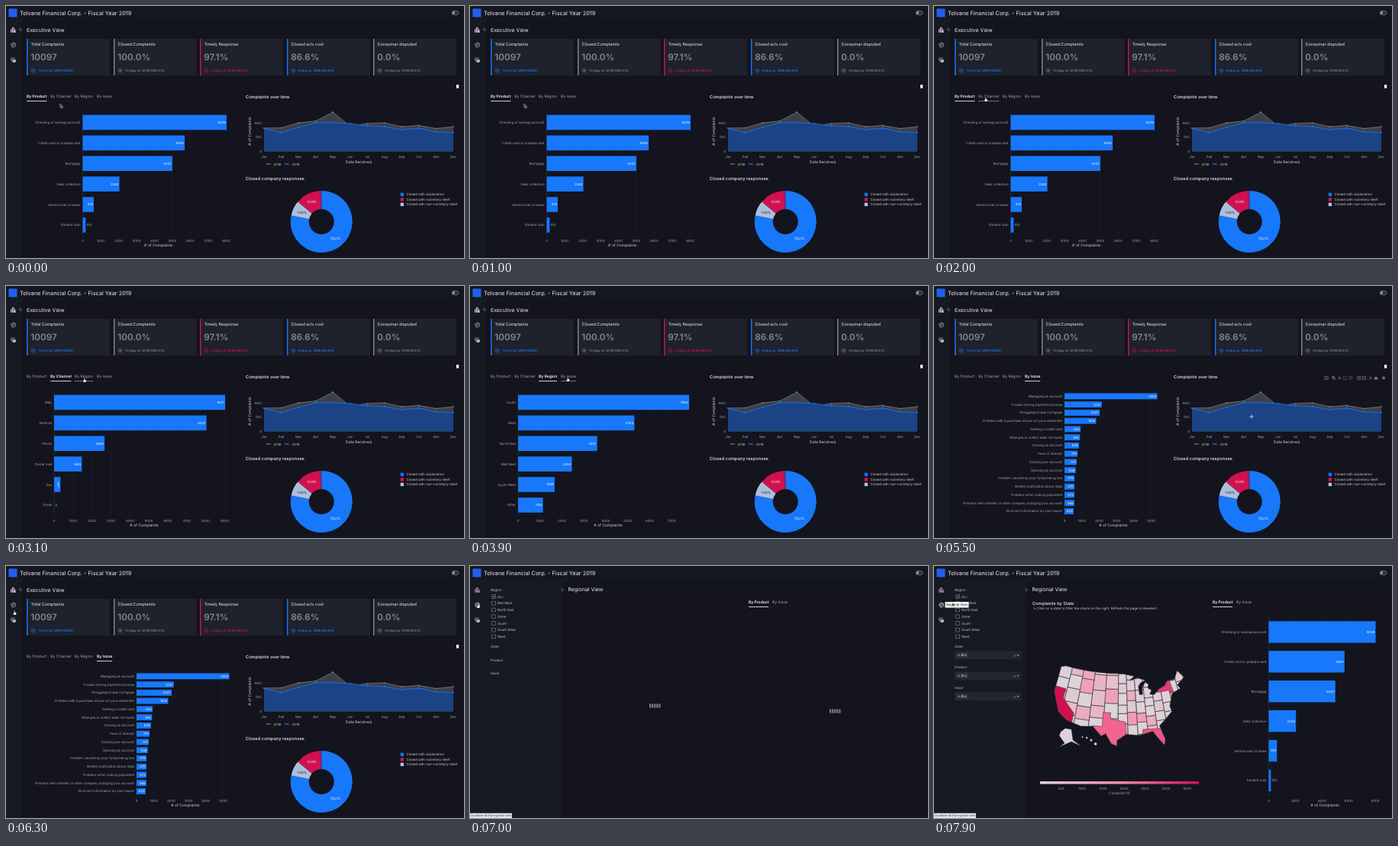
An HTML page that plays this animation: 600 by 330 pixels, repeating every 8000 ms.

```html
<!DOCTYPE html>
<html lang="en">
<head>
<meta charset="utf-8">
<title>Executive dashboard</title>
<style>
html, body { margin: 0; width: 100%; height: 100%; overflow: hidden; background: #13141e; }
svg { display: block; width: 600px; height: 330px; font-family: Inter, Roboto, sans-serif; text-rendering: geometricPrecision; }
</style>
</head>
<body>
<svg id="stage" viewBox="0 0 600 330"></svg>
<script>
const BLUE = '#1778fb', PINK = '#cf1150', PALE = '#adbedc', GREY = '#85878e';
const WHITE = '#ececee', LIGHT = '#d0d1d5', SOFT = '#a6a8ae', GRID = '#20232d', LAND = '#dcd3d8', DARK = '#2a2530';
const LOOP = 8000;

// Drawing helpers; text is placed by its vertical centre.
const text = (x, y, s, size = 4.35, fill = SOFT, anchor = 'start', weight = 400, extra = '') =>
  `<text x="${x}" y="${y + size * .36}" font-size="${size}" fill="${fill}" text-anchor="${anchor}" font-weight="${weight}" ${extra}>${s}</text>`;
const rect = (x, y, w, h, fill, extra = '') =>
  `<rect x="${x}" y="${y}" width="${w}" height="${h}" fill="${fill}" ${extra}/>`;
const path = (d, stroke, width = .6, fill = 'none', extra = '') =>
  `<path d="${d}" stroke="${stroke}" stroke-width="${width}" fill="${fill}" ${extra}/>`;
const circle = (x, y, r, fill, stroke = 'none') =>
  `<circle cx="${x}" cy="${y}" r="${r}" fill="${fill}" stroke="${stroke}" stroke-width=".6"/>`;
const group = (id, body, extra = '') => `<g id="${id}" ${extra}>${body}</g>`;
const each = (list, draw) => list.map(draw).join('');

function frame() {
  return rect(0, 0, 600, 18, '#151720') + rect(0, 18, 20, 312, '#171922') +
    path('M0 18H600M20 18V330', '#1e2029', .5) + rect(3.5, 3.5, 11, 11, '#1f5ff0') +
    text(18, 9, 'Tolvane Financial Corp. - Fiscal Year 2019', 7.4, WHITE) +
    rect(584, 6.6, 9, 4.8, '#2a2c35', 'rx="2.4" stroke="#9a9ca2" stroke-width=".6"') + circle(586.5, 9, 1.4, '#b4b6ba');
}

function navIcons(active) {
  const tone = i => i === active ? '#ececee' : '#aeb0b5';
  return path('M6.8 34V30.5H8.5V34M8.5 34V28.4H10.4V34M10.4 34V31.2H12.2V34ZM6 34H13', tone(0), .8) +
    circle(9.8, 51, 3, 'none', tone(1)) + path('M7 50L9.5 51.5L9 53.8M10.5 48.2L10 50L12.6 51.2', tone(1), .8) +
    rect(8.3, 69.9, 4.5, 4, tone(2)) + path('M6.8 72.3V68.2H11.6', tone(2), .8);
}

const collapse = x => circle(x, 31, 2.4, '#2a2c36') + path(`M${x + .6} 29.8L${x - .6} 31L${x + .6} 32.2`, '#999', .5);

function kpi([title, value, delta, tone], i) {
  const x = Math.round(27 + i * 113.5);
  return rect(x, 43, 109, 48, '#1f222c') + rect(x, 43, 1.4, 48, tone) +
    text(x + 5.5, 50, title, 5.55, WHITE) + text(x + 5.3, 66.9, value, 11.7, GREY, 'start', 600) +
    circle(x + 8.5, 84.5, 2.3, 'none', tone) + path(`M${x + 7.2} 84.5h2.6m-1.3 -1.3v2.6`, tone, .5) +
    text(x + 14.5, 84.5, delta, 4.2, tone, 'start', 600);
}

const tabs = (list, y, active) => each(list, ([x, w, s], i) => i === active
  ? text(x, y, s, 5, '#fff', 'start', 600) + rect(x, y + 6, w, .8, '#fff')
  : text(x, y, s, 5, SOFT));

// Horizontal bar chart: rows share the height evenly, the longest bar leaves a 5% margin.
function bars({ x0, right, top, step, rows }) {
  const max = Math.max(...rows.map(r => r[1])), k = (right - x0) / (1.053 * max), dy = (300.3 - top) / rows.length;
  let out = '';
  for (let v = 0; v <= max; v += step) {
    const x = x0 + v * k;
    out += path(`M${x} ${top}V301`, v ? GRID : '#3a3d47', .5) + text(x, 307, v, 4.35, SOFT, 'middle');
  }
  out += each(rows, ([name, v], i) => {
    const y = top + (i + .5) * dy, w = v * k, end = x0 + w, h = dy * .73;
    const label = w >= 10 ? text(end - 1.2, y, v, 4.2, '#fff', 'end')
      : w >= 8 ? text(0, 0, v, 4.2, '#fff', 'middle', 400, `transform="translate(${end - 2.8} ${y}) rotate(90)"`)
      : text(end + 1.2, y, v);
    return text(x0 - 3, y, name, 4.35, SOFT, 'end') + rect(x0, y - h / 2, w, h, BLUE) + label;
  });
  return out + text((x0 + right) / 2, 313, '# of Complaints', 5, LIGHT, 'middle');
}

const table = s => s.split(', ').map(r => r.match(/(.+) (\d+)/).slice(1)).map(([name, v]) => [name, +v]);
const products = table('Checking or savings account 8028, Credit card or prepaid card 5690, Mortgage 5000, Debt collection 2048, Vehicle loan or lease 618, Student loan 163');
const channels = table('Web 9031, Referral 8047, Phone 2665, Postal mail 1465, Fax 337, Email 4');
const regions = ['South', 'West', 'North East', 'Mid West', 'South West', 'Other'].map((s, i) => [s, Math.round(7800 * .68 ** i)]);
const issues = table('Managing an account 5353, Trouble during payment process 2147, Struggling to pay mortgage 2027, ' +
  'Problem with a purchase shown on your statement 1825, Getting a credit card 926, Attempts to collect debt not owed 894, ' +
  'Closing an account 834, Fees or interest 751, Closing your account 701, Opening an account 648, ' +
  'Problem caused by your funds being low 579, Written notification about debt 575, Problem when making payments 572, ' +
  'Problem with a lender or other company charging your account 566, Incorrect information on your report 523');

const viewTabs = [[27, 26.3, 'By Product'], [58.3, 27, 'By Channel'], [90, 24, 'By Region'], [119, 20, 'By Issue']];
const views = [[100.5, products], [63, channels], [63, regions], [171, issues]]
  .map(([x0, rows]) => ({ x0, rows, right: 299, top: 139, step: 1000 }));

function timeChart() {
  const at = i => 338 + i * 22.55;
  const series = [
    [160, 159.5, 153, 150.7, 139, 157.5, 154, 153, 158, 156.5, 160.5, 158],
    [160, 166, 159, 153, 152.3, 154, 157, 158, 162, 160, 165, 165.5]];
  const plots = each(series, (ys, n) => {
    const line = 'M' + ys.map((y, i) => `${at(i)} ${y}`).join('L'), tone = n ? BLUE : '#777a80', x = 340 + n * 24;
    return path(`${line}V190.5H338Z`, 'none', 0, n ? '#1b4386' : '#3d4046') + path(line, tone, .8) +
      each(ys, (y, i) => circle(at(i), y, .9, tone)) +
      path(`M${x} 207h7.5`, tone, .8) + circle(x + 3.8, 207, 1, tone) + text(x + 10.5, 207, 2018 + n, 4.35, LIGHT);
  });
  return text(314, 118.5, 'Complaints over time', 5.7, WHITE, 'start', 500) + path('M338 153H586M338 172H586', GRID, .5) + plots +
    each([1000, 500, 0], (v, i) => text(335, 153 + i * 18.7, v, 4.35, SOFT, 'end')) +
    each('Jan Feb Mar Apr May Jun Jul Aug Sep Oct Nov Dec'.split(' '), (m, i) => text(at(i), 197, m, 4.35, SOFT, 'middle')) +
    path('M338 190.5H586', '#3a3d47', .5) + text(462, 204.3, 'Date Received', 5, LIGHT, 'middle') +
    text(0, 0, '# of Complaints', 5, LIGHT, 'middle', 400, 'transform="translate(319 164) rotate(-90)"');
}

function donut() {
  const outer = 40.5, inner = 16.5;
  const point = (f, r) => `${413.3 + r * Math.sin(f * 2 * Math.PI)} ${282.4 - r * Math.cos(f * 2 * Math.PI)}`;
  const slices = [[.782, BLUE, '78.2%'], [.0794, PALE, '7.94%'], [.131, PINK, '13.8%'], [.0075, '#7a2f80', '']];
  let from = 0;
  const ring = each(slices, ([share, fill, label]) => {
    const a = from, b = from += share, big = +(share > .5), [x, y] = point((a + b) / 2, 28.5).split(' ').map(Number);
    return path(`M${point(a, outer)}A${outer} ${outer} 0 ${big} 1 ${point(b, outer)}L${point(b, inner)}A${inner} ${inner} 0 ${big} 0 ${point(a, inner)}Z`, 'none', 0, fill) +
      text(x, y, label, 4.35, fill === PALE ? '#20232d' : '#fff', 'middle');
  });
  return text(314, 225.7, 'Closed company responses', 5.8, WHITE, 'start', 500) + ring +
    each([['explanation', BLUE], ['monetary relief', PINK], ['non-monetary relief', PALE]], ([s, c], i) =>
      rect(516.7, 244.7 + i * 6.5, 4.4, 4.4, c) + text(524.5, 246.9 + i * 6.5, 'Closed with ' + s, 4.4, LIGHT));
}

function toolbar() {
  const c = '#74777e', box = (x, extra) => rect(x, 118.2, 4.3, 4.3, 'none', `stroke="${c}" stroke-width=".7" ${extra}`);
  return box(511.8) + circle(514, 120.3, .9, c) +
    circle(523.2, 119.8, 1.5, 'none', '#d5d6d9') + path('M524.3 121l1.5 1.5', '#d5d6d9', .9) +
    path('M529 120.3h4.4m-2.2 -2.2v4.4', c, .8) + box(536.6, 'stroke-dasharray="1 .5"') + circle(546, 120, 1.9, 'none', c) +
    box(554.8) + box(561.4) + path('M556 120.3h2m-1 -1v2M562.5 120.3h2M570 118.5l4 3.7m0 -3.7l-4 3.7', c, .8) +
    path('M576.8 120.5l2.2 -2.1l2.2 2.1v1.8h-4.4Z', c, .4, c) + rect(587.3, 118.7, 3.4, 3.4, c);
}

// Albers conic projection; longitudes are degrees west.
const rad = Math.PI / 180, cone = .60285;
const radius = lat => Math.sqrt(1.3512 - 2 * cone * Math.sin(lat * rad)) / cone;
function project(lon, lat) {
  const r = radius(lat), a = cone * (96 - lon) * rad;
  return `${244.5 + 235 * r * Math.sin(a)} ${186.2 - 235 * (radius(38) - r * Math.cos(a))}`;
}
function geo(s) {
  const p = s.split(',').map(q => q.split(' ').map(Number)), steps = [0, .2, .4, .6, .8];
  return 'M' + p.flatMap(([lon, lat], i) => {
    const [lon2, lat2] = p[(i + 1) % p.length];
    return steps.map(u => project(lon + (lon2 - lon) * u, lat + (lat2 - lat) * u));
  }).join('L') + 'Z';
}

const coast = '124.7 48.4,122.7 49,95 49,89.6 48,92 46.7,88 47.4,84.6 46.4,87 45.7,88 44.6,87.8 42,86.5 42,86.4 44,84.8 45.8,83.4 45,' +
  '83.9 43.8,82.4 43,83.4 41.8,81.5 41.5,79 43,76.3 43.7,74.8 45,71.4 45,69.2 47.4,67 44.8,70.8 43,70 41.7,74 40.7,76 37,75.6 35.3,' +
  '81.3 31.5,80 27,80.6 25.2,82.7 28,84 30.1,89.2 29.2,94 29.7,97.3 27.8,97.4 26,99.3 26.7,101.5 29.8,103.1 29,106.5 31.8,' +
  '111 31.3,117.1 32.5,120.6 34.5,124.4 40.4';
const hotStates = [
  [PINK, '125 42,120 42,120 39,114.6 35,114.6 32,126 32'],
  ['#f3648e', '103 36.5,100 36.5,100 34.6,94.2 33.6,94 29,97 25,107 29,106.6 32,103 32'],
  ['#ee5684', '87.6 31,81 30.6,79 24,88 29'],
  ['#e63c6f', '80 42,80 44,74 45.5,73.3 42,73 40.5,75.3 42']];

// States as seeded cells along meridians and parallels, wide in the west and small in the east.
function stateCells() {
  let seed = 11, out = '';
  const random = () => (seed = seed * 16807 % 2147483647) / 2147483647;
  for (let lon = 125, w; lon > 66; lon -= w) {
    w = lon > 100 ? 5.6 : 3.7;
    for (let lat = 25 + random() * 2, h; lat < 49; lat += h) {
      h = (lon > 100 ? 3.6 : 2.6) + random() * 1.4;
      out += path(geo(`${lon} ${lat},${lon - w} ${lat},${lon - w} ${lat + h},${lon} ${lat + h}`),
        DARK, .5, '#f58cab', `fill-opacity="${random() ** 3 * .8}"`);
    }
  }
  return out;
}

function usMap() {
  const land = geo(coast);
  return `<clipPath id="land"><path d="${land}"/></clipPath>` + path(land, 'none', 0, LAND) +
    group('states', stateCells() + each(hotStates, ([c, s]) => path(geo(s), DARK, .5, c)), 'clip-path="url(#land)"') +
    path(land, DARK, .5) +
    path('M166 217L172 212.5L180 214L182 228L193 236L180 230L164 237L171 232L164 222Z', DARK, .4, LAND) +
    each([0, 1, 2, 3], i => circle(194.5 + i * 5.7, 224 + i * i, .9 + i * .3, LAND));
}

function regional() {
  const boxes = each(['ALL', 'Mid West', 'North East', 'Other', 'South', 'South West', 'West'], (s, i) =>
    rect(28.7, 37.6 + i * 8.75, 4.7, 4.7, 'none', 'stroke="#85878e" stroke-width=".6"') + text(36, 40 + i * 8.75, s, 4.4, '#c4c5ca'));
  const filters = (gap, open) => each(['State', 'Product', 'Issue'], (s, i) => {
    const y = 105.7 + i * gap;
    return text(27, y, s, 4.4, '#c4c5ca') + (open ? rect(27, y + 5.6, 87, 10.8, '#23262f') +
      rect(29.5, y + 7.5, 15.5, 7, '#2f323b') + text(31, y + 11, '× ALL', 4.4, WHITE) +
      text(104, y + 11, '×', 5) + path(`M108.5 ${y + 10.3}h3l-1.5 1.9Z`, 'none', 0, SOFT) : '');
  }) + path(open ? 'M27 185H114' : 'M27 154H114', '#23262f', .5);
  const loader = (x, y) => each([0, 1, 2, 3, 4], i => rect(x + i * 3.1, y, 2.1, 5.2, '#7c7e84'));
  const loaded = filters(27, true) + text(129, 48.5, 'Complaints by State', 5.7, WHITE, 'start', 500) +
    path('M131 53v3h2m-1 -1l1 1l-1 1', '#c4c5ca', .4) +
    text(134.5, 55, 'Click on a state to filter the charts on the right. Refresh the page to deselect.', 4.4, LIGHT) + usMap() +
    `<linearGradient id="scale"><stop stop-color="#ded6da"/><stop offset=".5" stop-color="#f68bab"/><stop offset="1" stop-color="${PINK}"/></linearGradient>` +
    rect(139, 282, 208, 3.5, 'url(#scale)') +
    each([1, 2, 3, 4, 5, 6, 7], i => text(139 + i * 27.5, 291, i * 500, 4.35, SOFT, 'middle')) +
    text(243, 297, 'Complaint ID', 4.6, SOFT, 'middle') +
    bars({ x0: 438.5, right: 586, top: 67, step: 2000, rows: products });
  return rect(20, 18, 101, 312, '#171922') + path('M121 18V330', '#1e2029', .5) + navIcons(1) + collapse(121) +
    text(27, 31, 'Region', 4.5, '#c4c5ca') + boxes + path('M29.8 40l1 1.2l1.8 -2.4', WHITE) +
    text(128.5, 31, 'Regional View', 6.9, WHITE) + path('M365 53.4H590', '#1c1f29', .5) +
    tabs([[365, 26, 'By Product'], [396, 20, 'By Issue']], 47, 0) +
    group('loading', filters(17.3, false) + loader(235, 180.5) + loader(471, 187.4)) + group('loaded', loaded);
}

const executive = navIcons(0) + collapse(19) + text(27, 31, 'Executive View', 6.95, WHITE) +
  each([['Total Complaints', '10097', '-11.6% vs. 2018 (11452)', BLUE],
    ['Closed Complaints', '100.0%', '+0.0pp vs. 2018 (100.0%)', GREY],
    ['Timely Response', '97.1%', '-1.0pp vs. 2018 (98.0%)', PINK],
    ['Closed w/o cost', '86.6%', '0.8pp vs. 2018 (85.8%)', BLUE],
    ['Consumer disputed', '0.0%', '+0.0pp vs. 2018 (0.0%)', GREY]], kpi) +
  rect(590, 103, 3.2, 4.6, '#fff') + path('M27 124.4H305', '#1f222b', .5) +
  each(views, (v, i) => group('view' + i, tabs(viewTabs, 118.2, i) + bars(v))) +
  group('hover', '') + timeChart() + donut() + group('toolbar', toolbar());

document.getElementById('stage').innerHTML = frame() + group('executive', executive) + group('regional', regional()) +
  group('status', rect(0, 323.7, 55, 6.3, '#dce8f8') + text(1.2, 326.9, 'localhost:8050/regional-view', 3.85, '#333a48')) +
  group('tip', rect(14.5, 47, 31, 7.6, '#f4f4f5') + text(30, 50.8, 'Regional View', 4.2, '#22252e', 'middle')) +
  group('cursor', group('arrow', path('M0 0V5L1.2 4L2 5.8L3 5.4L2.2 3.7H3.7Z', '#fff', .5, '#111')) +
    group('hand', path('M-.5 0H.4V2L2.4 2.6V4.4L1.8 5.6H-.6L-2 3.4L-1.4 3L-.5 3.8Z', '#222', .3, '#fff')) +
    group('cross', path('M-2.6 0H2.6M0 -2.6V2.6', '#c4dcff', .9)));

const $ = id => document.getElementById(id);
const show = (id, on) => $(id).style.display = on ? '' : 'none';

// Pointer stops: arrival time and place; every move takes MOVE ms.
const MOVE = 450;
const stops = [[0, 71, 128], [1700, 67.5, 119.5], [2950, 102.5, 120.5], [3800, 128, 119.5],
  [4600, 416, 171], [6100, 11, 58.5], [6750, 10.5, 49.5], [7600, 24, 48]];
const pointer = t => stops.reduce(([x, y], [arrive, x1, y1]) => {
  const u = Math.min(1, Math.max(0, (t - arrive) / MOVE + 1)), e = u * u * (3 - 2 * u);
  return [x + (x1 - x) * e, y + (y1 - y) * e];
}, [71, 128]);

function draw(now) {
  const t = now % LOOP, [x, y] = pointer(t);
  const view = [2300, 3300, 4000].filter(s => t >= s).length, away = t >= 6800;
  const overTab = y > 114 && y < 124 ? viewTabs.findIndex(([a, w]) => x >= a && x <= a + w) : -1;
  const overChart = !away && x > 338 && x < 586 && y > 130 && y < 191;
  const hand = overTab >= 0 || (x < 16 && y < 62);
  const [left, width] = viewTabs[overTab] || [0, 0];
  show('executive', !away);
  show('regional', away);
  views.forEach((v, i) => show('view' + i, i === view));
  $('hover').innerHTML = overTab === view ? '' : rect(left, 124.2, width, .8, GREY);
  show('toolbar', overChart);
  show('loading', t < 7500);
  show('loaded', t >= 7500);
  show('status', t >= 6600);
  show('tip', t >= 7600);
  show('hand', hand);
  show('cross', overChart);
  show('arrow', !hand && !overChart);
  $('cursor').setAttribute('transform', `translate(${x} ${y})`);
}

const start = performance.now();
function loop() {
  draw(performance.now() - start);
  requestAnimationFrame(loop);
}
loop();
</script>
</body>
</html>
```
